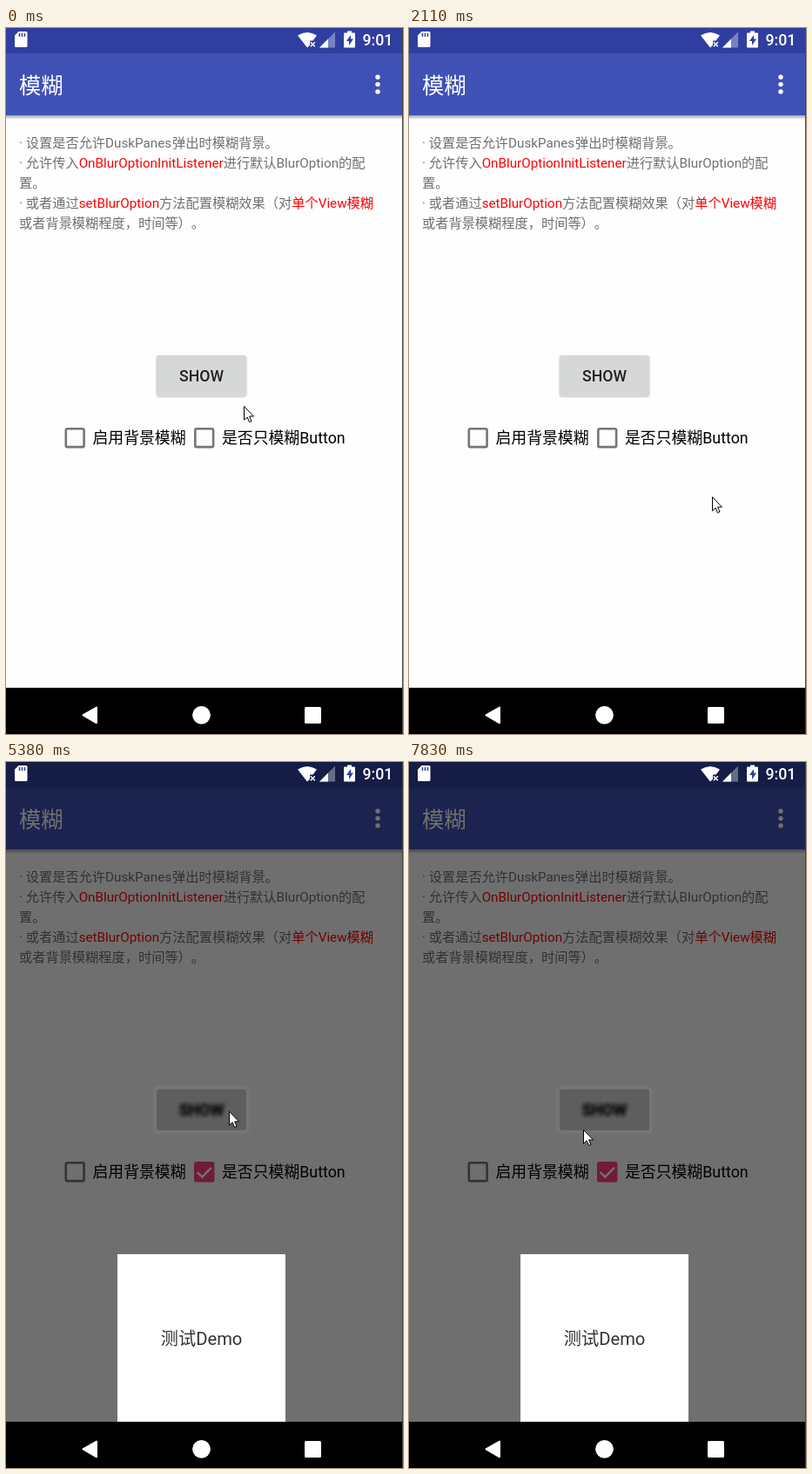
Animation of 456x809 px, one loop 8000 ms. Source, as an HTML page:

```html
<!DOCTYPE html>
<html lang="zh-CN">
<head>
<meta charset="utf-8">
<title>模糊</title>
<style>
  html, body { margin: 0; width: 100%; height: 100%; overflow: hidden; background: #000; }
  svg { display: block; width: 100%; height: 100%; }
  text {
    font-family: Roboto, "Noto Sans CJK SC", "Noto Sans CJK", sans-serif;
    white-space: pre;
    text-spacing-trim: space-all;
  }
  .note { font-size: 15.22px; fill: #707070; }
  .hot { fill: #f00; }
  .label { font-size: 17.85px; fill: #000; }
  .strong { font-size: 17.7px; font-weight: 500; }
</style>
</head>
<body>
<svg viewBox="0 0 456 809" preserveAspectRatio="none">
  <defs>
    <linearGradient id="barShade" x2="0" y2="1">
      <stop stop-color="#000" stop-opacity=".36"/>
      <stop offset="1" stop-color="#000" stop-opacity="0"/>
    </linearGradient>
    <filter id="soft" x="-30%" y="-80%" width="160%" height="260%"><feGaussianBlur stdDeviation="2.3"/></filter>
    <filter id="edge" x="-10%" y="-20%" width="120%" height="140%"><feGaussianBlur stdDeviation="1.2"/></filter>
    <clipPath id="screen"><rect width="455" height="756"/></clipPath>
  </defs>

  <rect width="456" height="809" fill="#fefefe"/>
  <rect y="100" width="455" height="5" fill="url(#barShade)"/>
  <rect width="455" height="100" fill="#3f51b5"/>
  <rect width="455" height="29" fill="#303f9f"/>
  <text x="15" y="74.6" font-size="25.3" fill="#fff">模糊</text>
  <g fill="#fff">
    <circle cx="427" cy="56.3" r="2.7"/><circle cx="427" cy="64.6" r="2.7"/><circle cx="427" cy="72.9" r="2.7"/>
  </g>

  <text class="note" x="15" y="137">· 设置是否允许DuskPanes<tspan x="191.1">弹出时模糊背景。</tspan></text>
  <text class="note" x="15" y="160">· 允许传入<tspan class="hot">OnBlurOptionInitListener</tspan>进行默认BlurOption的配</text>
  <text class="note" x="15" y="183">置。</text>
  <text class="note" x="15" y="206">· 或者通过<tspan class="hot">setBlurOption</tspan>方法配置模糊效果（对<tspan class="hot">单个View模糊</tspan></text>
  <text class="note" x="15" y="229">或者背景模糊程度，时间等）。</text>

  <rect id="shadow" x="173" y="376" width="103" height="46.5" rx="3" filter="url(#edge)"/>
  <rect x="173" y="375" width="103" height="47" rx="2.5" fill="#d6d7d7"/>
  <rect id="ripple" x="173" y="375" width="103" height="47" rx="2.5"/>
  <text id="sharp" class="strong" x="224.5" y="405" text-anchor="middle" fill="#212121">SHOW</text>
  <text id="blurred" class="strong" x="224.5" y="405" text-anchor="middle" fill="#111" stroke="#111" filter="url(#soft)">SHOW</text>

  <g fill="none" stroke="#757575" stroke-width="2.6">
    <rect x="68.8" y="459.3" width="20.8" height="20.8" rx="1.6"/>
    <rect id="empty" x="217.3" y="459.3" width="20.8" height="20.8" rx="1.6"/>
  </g>
  <text class="label" x="99.5" y="476">启用背景模糊</text>
  <text class="label" x="248" y="476">是否只模糊Button</text>
  <circle id="touch" cx="228" cy="470" r="25" fill="#ff4081"/>
  <g id="checked">
    <rect x="216" y="458" width="23.4" height="23.4" rx="2.5" fill="#ff4081"/>
    <path d="M219.8 470.2l5.5 5.4 10.5-10.7" fill="none" stroke="#fff" stroke-width="2.5"/>
  </g>

  <rect id="scrim" width="455" height="756"/>
  <rect id="halo" x="171" y="373" width="107" height="51" rx="4" fill="none" stroke="#fff" stroke-width="4" filter="url(#edge)"/>

  <g clip-path="url(#screen)">
    <g id="popup">
      <rect x="128" width="193" height="193" fill="#fff"/>
      <text x="224.6" y="104" font-size="20.2" text-anchor="middle" fill="#333">测试Demo</text>
    </g>
  </g>

  <g fill="#fff">
    <path d="M14.5 4H23q1.5 0 1.5 1.5V20.5q0 1.5-1.5 1.5H11.5Q10 22 10 20.5V8.5z"/>
    <path d="M15.5 6v4M18.5 6v4M21.5 6v4" stroke="#303f9f" stroke-width="1.5"/>
    <path d="M335 8.5Q346 1.5 357 8.5L352.5 14.5H349V19.5L346 22.5z"/>
    <path d="M349.8 16.2l5 5m0-5l-5 5" stroke="#fff" stroke-width="1.5"/>
    <path d="M360 22.5L378 4.5V22.5z" opacity=".35"/>
    <path d="M360 22.5L370 12.5V22.5z"/>
    <path d="M392 3.5h5v2h3q1 0 1 1v15q0 1-1 1h-11q-1 0-1-1v-15q0-1 1-1h3z"/>
    <path d="M396 8l-5 7h3v5l5-7.5h-3z" fill="#303f9f"/>
    <text class="strong" x="409.5" y="20.3">9:01</text>
  </g>

  <rect y="756" width="456" height="53"/>
  <g fill="#fff">
    <path d="M88.5 787.3L104 778.5V796.3z" stroke="#fff" stroke-width="2" stroke-linejoin="round"/>
    <circle cx="224.5" cy="787.3" r="10.4"/>
    <rect x="343" y="778" width="19" height="19" rx="1.5"/>
  </g>
  <rect x="455" width="1" height="809" fill="#444"/>

  <path id="cursor" d="M.5.5V16.2L4.1 12.9L6.5 18.5L9 17.4L6.6 12H11.5z" fill="#fff" stroke="#000"/>
</svg>

<script>
const LOOP = 8000, DIM = 0.56, CHECK = 2910;
const el = {};
for (const node of document.querySelectorAll('[id]')) el[node.id] = node;

const sheets = [
  { press: 650, open: 820, close: 1840, blur: 0 },
  { press: 3700, open: 3819, close: 5410, blur: 1 },
  { press: 6410, open: 6559, close: 9000, blur: 1 }
];

// time, x, y of the pointer tip
const path = [
  [0, 273, 433], [20, 272, 431], [160, 252, 401], [1300, 252, 401], [1450, 359, 532],
  [1480, 358, 532], [1540, 348, 537], [2230, 348, 537], [2640, 238, 478], [2670, 236, 478],
  [2700, 229, 476], [3290, 229, 476], [3530, 243, 401], [4290, 243, 401], [4450, 256, 400],
  [7300, 256, 400], [7510, 289, 443], [7600, 286, 441], [7830, 200, 421], [LOOP, 200, 421]
];

const ramp = (t, start, span) => Math.min(1, Math.max(0, (t - start) / span));
const ease = k => (1 - Math.cos(Math.PI * k)) / 2;
const decel = k => 1 - (1 - k) ** 2;
const fade = (node, value) => node.setAttribute('opacity', value);
const move = (node, x, y) => node.setAttribute('transform', `translate(${x} ${y})`);

function pointer(t) {
  const i = path.findIndex(p => p[0] > t);
  const a = path[i - 1], b = path[i];
  const k = ease(ramp(t, a[0], b[0] - a[0]));
  return [1, 2].map(n => Math.round(a[n] + (b[n] - a[n]) * k));
}

function sheetState(t) {
  const state = { slide: 0, dim: 0, blur: 0, ripple: 0, raised: 0 };
  for (const s of sheets) {
    if (t >= s.press && t < s.open + 300) state.raised = 1;
    if (t < s.open || t >= s.close + 270) continue;
    state.slide = ease(ramp(t, s.open, 450)) - ease(ramp(t, s.close, 300));
    state.dim = decel(ramp(t, s.open, 210)) - decel(ramp(t, s.close, 180));
    state.blur = s.blur * (ramp(t, s.open, 300) - ramp(t, s.close, 180));
    state.ripple = ramp(t, s.open, 60) - ramp(t, s.open + 100, 300);
  }
  return state;
}

function draw(t) {
  const s = sheetState(t);
  fade(el.scrim, DIM * s.dim);
  move(el.popup, 0, Math.round(756 - 192 * s.slide));

  fade(el.sharp, 1 - s.blur);
  fade(el.blurred, s.blur);
  fade(el.halo, 0.05 * s.blur);
  fade(el.ripple, 0.05 * s.ripple);
  fade(el.shadow, (0.3 + 0.15 * s.raised) * (1 - s.blur));

  const on = ramp(t, CHECK, 200);
  fade(el.checked, on);
  fade(el.empty, 1 - on);
  fade(el.touch, 0.2 * (ramp(t, CHECK, 100) - ramp(t, CHECK + 160, 300)));

  move(el.cursor, ...pointer(t));
}

const begin = performance.now();
function tick() {
  draw((performance.now() - begin) % LOOP);
  requestAnimationFrame(tick);
}
tick();
</script>
</body>
</html>
```
